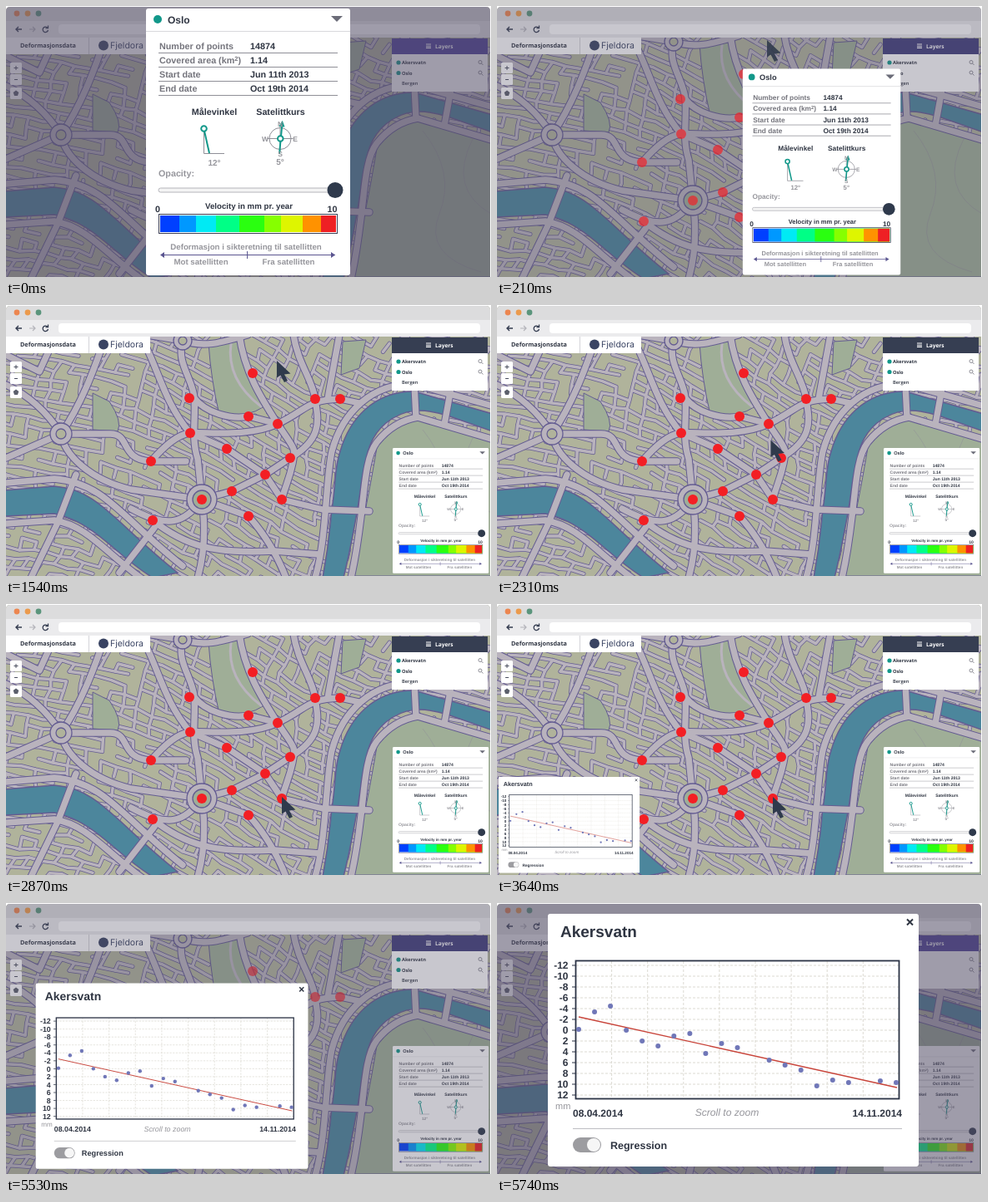
These frames come from a looping animation (582x326 px, 5.81 s). An HTML page:

```html
<!DOCTYPE html>
<html lang="no">
<head>
<meta charset="utf-8">
<title>Deformasjonsdata</title>
<style>
html, body { margin: 0; width: 100%; height: 100%; overflow: hidden; background: #fff; }
svg { display: block; width: 582px; height: 326px; text-rendering: geometricPrecision; }
text { font: bold 10.75px "Liberation Sans", Arial, sans-serif; fill: #2f3542; }
.ui text { font-family: "Open Sans", sans-serif; font-size: 5.7px; }
.grey text, text.grey { fill: #96969c; }
.mid { text-anchor: middle; }
.end { text-anchor: end; }
.line { fill: none; stroke: #8f8f97; }
.teal { fill: none; stroke: #12988a; stroke-width: 2; }
.road { fill: none; stroke-linecap: round; stroke-linejoin: round; }
.edge { stroke: #645c92; }
.fill { stroke: #b9b3bd; }
.water { fill: #4c869c; stroke: #645c92; stroke-width: 1.5; }
.park { fill: #9fae97; stroke: #645c92; }
</style>
</head>
<body>
<svg viewBox="0 0 582 326">
  <defs>
    <clipPath id="window"><path d="M0 326V6Q0 1 5 1H576Q581 1 581 6V326Z"/></clipPath>
    <path id="streets"/>
    <g id="avenues">
      <path d="M212 43C204 70 224 88 226 112S222 160 230 185L235 234M212 43L170 36M212 43C240 52 262 44 290 36"/>
      <path d="M168 50C185 85 192 120 221 154M66 155C90 120 105 80 120 36M66 155H125C150 155 136 186 174 188H216"/>
      <path d="M66 155C50 130 30 110 0 96M66 155C70 180 100 210 150 222L235 234M66 155L0 184"/>
      <path d="M174 188C190 170 205 156 221 154S290 160 326 143S360 114 401 113L424 118"/>
      <path d="M226 112C240 130 270 138 291 134L326 143M280 36C286 80 306 112 326 143S348 170 344 190S336 215 331 234"/>
      <path d="M345 36C350 70 368 90 371 113S382 160 341 184L311 204L271 224L235 234M400 36L386 113"/>
      <path d="M221 154L265 173L311 204L331 234L380 246L436 248M235 234L291 254C310 275 325 300 336 328"/>
      <path d="M235 234C215 262 195 270 150 245M235 234C240 270 238 300 230 328M176 259C215 290 250 300 322 296L376 300"/>
      <path d="M371 328C385 280 383 215 391 176C404 128 440 94 490 95L582 121M414 328C432 250 426 190 445 165Q465 140 494 135L582 161"/>
      <path d="M0 214L58 209C120 214 140 258 212 314M0 263L58 259C100 266 122 302 170 334M84 204L62 262L30 328M178 268L136 322"/>
      <path d="M490 95L492 135M534 100L526 144M60 36L40 80L0 60"/>
    </g>
  </defs>

  <g clip-path="url(#window)">
    <rect width="582" height="326" fill="#b0b39b"/>
    <use href="#streets" class="road edge" stroke-width="5"/>
    <use href="#streets" class="road fill" stroke-width="3.5"/>
    <path class="park" d="M243 46L280 44Q286 90 310 122Q290 136 256 132Q246 90 243 46ZM104 106L124 116Q140 140 134 152L104 150ZM404 44L432 42L424 76L402 84Z"/>
    <path class="park" d="M446 166Q466 140 494 136L582 162V326H414Q432 250 446 166Z"/>
    <path class="line" stroke-opacity=".5" d="M500 150Q540 200 520 250T570 320M560 160Q530 220 582 250"/>
    <path d="M270 46Q264 90 306 122" class="road fill" stroke-width="3"/>
    <path class="water" d="M380 328C389 280 389 260 391 246C396 215 394 195 401 176C412 138 440 104 490 104L584 131V152L530 133C500 124 478 124 456 142C434 160 432 185 427 210C422 250 412 300 405 328Z"/>
    <path class="water" d="M-2 223L58 218C112 222 130 262 206 322L176 328C130 300 108 262 58 251L-2 254Z"/>
    <use href="#avenues" class="road edge" stroke-width="9.4"/>
    <use href="#avenues" class="road fill" stroke-width="7.4"/>
    <g fill="#b9b3bd" stroke="#645c92" stroke-width="1.3">
      <circle cx="66" cy="155" r="13"/><circle cx="66" cy="155" r="6" fill="#b0b39b"/>
      <circle cx="212" cy="43" r="11"/><circle cx="212" cy="43" r="5" fill="#b0b39b"/>
      <circle cx="235" cy="234" r="18"/><circle cx="235" cy="234" r="11" fill="#9fae97"/>
    </g>

    <g class="ui">
      <rect width="582" height="19" fill="#dcdcdd"/>
      <rect y="18" width="582" height="20" fill="#ebebed"/>
      <circle cx="13" cy="9" r="3.4" fill="#ec8650"/>
      <circle cx="26" cy="9" r="3.4" fill="#eb9a4c"/>
      <circle cx="39" cy="9" r="3.4" fill="#5b957c"/>
      <rect x="63" y="22" width="506" height="12" rx="4" fill="#fff"/>
      <path d="M19 28H11.500M15 25L12 28L15 31" class="line" style="stroke:#343c50;stroke-width:1.4"/>
      <path d="M28 28H35M32 25L35 28L32 31" class="line" style="stroke:#b4b4ba;stroke-width:1.2"/>
      <path d="M49.500 26A3.200 3.200 0 1 0 50.500 29M50.500 23.500V26.500H47.500" class="line" style="stroke:#343c50;stroke-width:1.3"/>
      <rect y="38" width="173" height="20" fill="#fff"/>
      <path d="M99.500 38V58" stroke="#d4d4d8"/>
      <text x="17" y="50" style="font-size:7.25px">Deformasjonsdata</text>
      <circle cx="117" cy="47.500" r="6" fill="#3a4463"/>
      <text x="125" y="51" style="font:10.5px Inter,sans-serif;fill:#3a4463">Fjeldora</text>
      <g fill="#fff">
        <rect x="5" y="68" width="14" height="13" rx="1.500"/>
        <rect x="5" y="82" width="14" height="13" rx="1.500"/>
        <rect x="5" y="98" width="14" height="14" rx="1.500"/>
      </g>
      <path d="M9.500 74.500H14.500M12 72V77M10 88.500H14" stroke="#4a4f5e"/>
      <path d="M12 101.500L15.300 104L14 108H10L8.700 104Z" fill="#5c606c"/>
      <rect x="463" y="57" width="115" height="46" fill="#fff"/>
      <rect x="463" y="39" width="115" height="19" fill="#363e52"/>
      <rect id="accent" x="463" y="39" width="115" height="19" fill="#4b3f9a"/>
      <path d="M504 46H510M504 48.200H510M504 50.400H510" stroke="#fff" stroke-width="1.100"/>
      <text x="515" y="50.500" style="font-size:6.6px;fill:#fff">Layers</text>
      <g fill="#12988a"><circle cx="471" cy="68" r="2.600"/><circle cx="471" cy="80.500" r="2.600"/></g>
      <text x="475" y="70">Akersvatn</text>
      <text x="475" y="82.500">Oslo</text>
      <text x="475" y="95" style="font-weight:600">Bergen</text>
      <path class="line" d="M570.500 69L572.500 71M570.500 81.500L572.500 83.500M571 67.500A2 2 0 1 1 567 67.500A2 2 0 1 1 571 67.500M571 80A2 2 0 1 1 567 80A2 2 0 1 1 571 80"/>
    </g>

    <rect id="dimUnder" width="582" height="326" fill="#504c64"/>
    <g id="dots" fill="#f31f24"></g>

    <g id="oslo">
      <rect x="168" y="3" width="245" height="321" rx="3" fill="#fff"/>
      <circle cx="182" cy="16" r="5" fill="#12988a"/>
      <text x="194" y="20.500" style="font-size:12px">Oslo</text>
      <path d="M390 12H404L397 19Z" fill="#6b6c78"/>
      <path d="M168 30.500H413" stroke="#d8d8dc"/>
      <g id="facts"></g>
      <g class="mid">
        <text x="250" y="131">Målevinkel</text>
        <text x="329.500" y="131">Satelittkurs</text>
      </g>
      <path class="line" d="M237.500 148V177.500H262"/>
      <path class="teal" d="M237.500 148L244 177"/>
      <circle class="line" cx="329" cy="159.500" r="13"/>
      <path class="line" d="M329 144V175M313.500 159.500H344.500"/>
      <path class="teal" d="M331.500 141L328 178M328.500 145L331.500 140L333.500 145.500"/>
      <g class="teal" style="fill:#fff"><circle cx="237.500" cy="147.500" r="3.300"/><circle cx="329.300" cy="159.500" r="3.300"/></g>
      <g class="grey mid">
        <text x="250" y="192" style="font-size:10px">12°</text>
        <text x="329" y="191" style="font-size:10px">5°</text>
        <g id="compass"></g>
        <text x="204.500" y="205">Opacity:</text>
      </g>
      <rect x="183" y="219" width="215" height="5" rx="2.500" fill="#f4f4f4" stroke="#b4b4ba"/>
      <circle cx="395" cy="221.500" r="9.500" fill="#2f3a4c"/>
      <g class="mid">
        <text x="182" y="248">0</text><text x="391.500" y="248">10</text>
        <text x="291.500" y="244" style="font-size:9.7px">Velocity in mm pr. year</text>
      </g>
      <rect x="183.500" y="250.500" width="214" height="23" fill="#fff" stroke="#3c3f55"/>
      <g id="scale"></g>
      <g class="grey mid" id="legend"></g>
      <path d="M186 299.500H395M289.500 295V304" stroke="#5a5590"/>
      <path d="M185 299.500L190 296V303ZM395 299.500L390 296V303Z" fill="#5a5590"/>
    </g>

    <rect id="dimOver" width="582" height="326" fill="#504c64"/>
    <path id="cursor" d="M0 0V20.500L4.500 17.500L9 26L13 24L9 16.500L16.500 15.500Z" fill="#2f3a4c"/>

    <g id="chart">
      <rect x="61" y="13" width="445" height="304" rx="3" fill="#fff"/>
      <text x="76" y="41" style="font-size:19px">Akersvatn</text>
      <path d="M492 19.500L499 26.500M499 19.500L492 26.500" stroke="#2f3542" stroke-width="2"/>
      <g id="grid" class="end"></g>
      <rect x="94.500" y="69.500" width="388" height="166" fill="none" stroke="#2b3345" stroke-width="1.800"/>
      <path d="M98 137L480 222" stroke="#c8443a" stroke-width="1.300"/>
      <g id="samples" fill="#7077b8"></g>
      <text x="70" y="248" class="grey" style="font-size:11px;font-weight:400">mm</text>
      <text x="91" y="256.500" style="font-size:12px">08.04.2014</text>
      <text x="486" y="256.500" class="end" style="font-size:12px">14.11.2014</text>
      <text x="276" y="256" class="grey mid" style="font-size:12.1px;font-weight:400;font-style:italic">Scroll to zoom</text>
      <path d="M91 271.500H486" stroke="#bdbdc2"/>
      <rect x="91" y="282" width="34" height="18" rx="9" fill="#9c9ca0"/>
      <circle cx="116" cy="291" r="8" fill="#f6f6f6"/>
      <text x="136" y="296" style="font-size:12.5px">Regression</text>
    </g>
  </g>
</svg>
<script>
const $ = id => document.getElementById(id);
const fillGroup = (id, items, draw) => { $(id).innerHTML = items.map(draw).join(''); };
const circle = (x, y, r) => `<circle cx="${x}" cy="${y}" r="${r}"/>`;
const label = (x, y, size, s) => `<text x="${x}" y="${y}" style="font-size:${size}px">${s}</text>`;

// Minor streets: a rotated, gently warped grid with missing edges
const noise = (i, j, k) => {
  const v = Math.sin(i * 12.9898 + j * 78.233 + k * 37.719) * 43758.5453;
  return v - Math.floor(v);
};
function node(i, j) {
  const u = i * 17 + 16 * Math.sin(j / 5 + i / 9) + 4 * noise(i, j, 1);
  const v = j * 12 + 18 * Math.sin(i / 5) + 4 * noise(i, j, 2);
  return [291 + u * 0.94 - v * 0.34, 180 + u * 0.34 + v * 0.94].map(n => n.toFixed(1));
}
let streets = '';
for (let i = -24; i < 24; i++) for (let j = -28; j < 28; j++) {
  const [x, y] = node(i, j);
  if (x < -20 || x > 602 || y < 20 || y > 346) continue;
  if (noise(i, j, 3) < 0.8) streets += `M${x} ${y}L${node(i + 1, j)}`;
  if (noise(i, j, 4) < 0.55) streets += `M${x} ${y}L${node(i, j + 1)}`;
}
$('streets').setAttribute('d', streets);

fillGroup('dots', [
  [296, 82], [220, 112], [291, 134], [326, 143], [371, 113], [401, 113], [221, 154], [265, 173],
  [174, 188], [341, 184], [311, 204], [271, 224], [331, 234], [235, 234], [291, 254], [176, 259]
], ([x, y]) => circle(x, y, 6));

fillGroup('facts', [
  ['Number of points', '14874'],
  ['Covered area (km<tspan dy="-3" font-size="7.500">2</tspan><tspan dy="3">)</tspan>', '1.14'],
  ['Start date', 'Jun 11th 2013'],
  ['End date', 'Oct 19th 2014']
], ([name, value], i) => {
  const y = 52 + i * 17;
  return `<text x="184" y="${y}" style="fill:#74747c">${name}</text>` + label(293, y, 10.75, value) +
    `<path class="line" d="M183 ${y + 4.5}H398"/>`;
});

fillGroup('compass', [['N', 329, 145], ['S', 329, 181], ['W', 311, 163], ['E', 347, 163]],
  ([s, x, y]) => label(x, y, 8.5, s));

fillGroup('legend', [
  [288, 293, 'Deformasjon i sikteretning til satellitten'],
  [234, 311, 'Mot satellitten'],
  [339, 311, 'Fra satellitten']
], ([x, y, s]) => label(x, y, 9.7, s));

// Each colour covers the scale from its start to the right end
fillGroup('scale', [
  [185, '#0040ff'], [208, '#0098ff'], [228, '#00eaf4'], [252, '#00ff86'], [280, '#2aff10'],
  [310, '#86ff00'], [330, '#def500'], [356, '#ff9200'], [378, '#ee2024']
], ([x, c]) => `<rect x="${x}" y="252" width="${396 - x}" height="20" fill="${c}"/>`);

const range = n => [...Array(n).keys()];
fillGroup('grid', range(13), i => {
  const y = 75 + i * 13;
  const column = i > 0 && i < 9 ? `M${94.5 + i * 43.1} 70V235` : '';
  return label(85.5, y + 4.3, 12, i * 2 - 12) + `<path d="M90 ${y}H94" stroke="#2b3345"/>` +
    `<path d="M95 ${y}H482${column}" stroke="#dcdad2" stroke-dasharray="3 2"/>`;
});

const heights = [152, 131, 124, 153, 166, 172, 160, 157, 181, 169, 174, 0, 189, 195, 201, 220, 213, 216, 0, 214, 216];
fillGroup('samples', heights, (y, i) => y ? circle(98 + i * 19.05, y, 3) : '');

const LOOP = 5810, STEP = 70;
const mix = (a, b, p) => a.map((v, i) => v + (b[i] - v) * p);
const progress = (t, start, end) => Math.min(1, Math.max(0, (t - start) / (end - start)));
const place = (id, [x, y, s], [ox, oy]) =>
  $(id).setAttribute('transform', `translate(${x} ${y}) scale(${s}) translate(${-ox} ${-oy})`);
const fade = (id, a) => $(id).setAttribute('opacity', a);

function draw(now) {
  const t = Math.floor(now % LOOP / STEP) * STEP;
  const dock = progress(t, 0, 490);
  const travel = progress(t, 1330, 2870);
  const pop = progress(t, 3290, 3640);
  const zoom = progress(t, 5250, 5740);
  const dim = 1 - dock + zoom;

  fade('accent', dim);
  fade('dimUnder', 0.55 * (1 - dock));
  fade('dimOver', 0.55 * zoom);
  fade('dots', 1 - dim ** 2);
  fade('cursor', 1 - dim ** 4);
  fade('chart', pop);

  place('oslo', mix([168, 3, 1], [464, 172, 0.47], dock), [168, 3]);
  const corner = [2, 208, 0.38];
  place('chart', zoom ? mix(corner, [61, 13, 1], zoom) : mix([331, 234, 0.15], corner, pop), [61, 13]);
  place('cursor', [...mix([324, 41], [331, 232], travel), 1], [0, 0]);
}

const begin = performance.now();
function tick() {
  draw(performance.now() - begin);
  requestAnimationFrame(tick);
}
tick();
</script>
</body>
</html>
```
